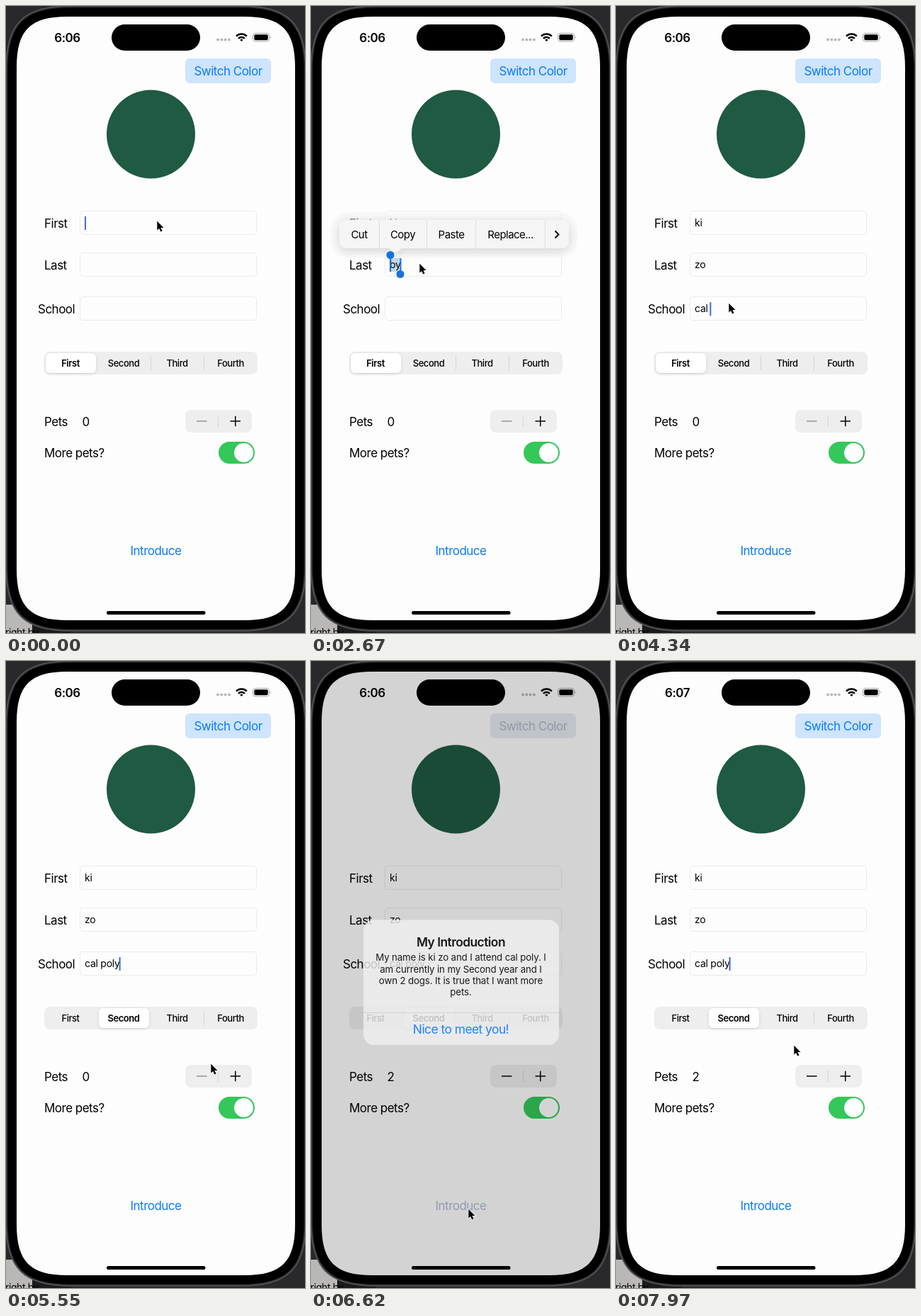
Recreate the animation shown at these times as an HTML page. Size 422 px wide and 885 px high, loop 8 s.

```html
<!DOCTYPE html>
<html lang="en">
<head>
<meta charset="utf-8">
<title>Introduction form</title>
<style>
  html, body { margin: 0; width: 100%; height: 100%; overflow: hidden; background: #29292c; }
  svg { display: block; width: 100vw; height: 100vh; }
  text { font: 17px Inter, sans-serif; letter-spacing: -.03em; white-space: pre; }
  .mid { text-anchor: middle; }
  .bold { font-weight: 600; }
  .field { font-size: 14px; letter-spacing: -.018em; }
  .seg { font-size: 13px; font-weight: 500; letter-spacing: -.035em; text-anchor: middle; }
  .menu { font-size: 15px; letter-spacing: -.035em; text-anchor: middle; }
  .msg { font-size: 13px; letter-spacing: -.01em; text-anchor: middle; }
  .box { fill: #fdfdfd; stroke: #ebebed; }
  .gray { fill: #eeeeef; }
  .line { stroke: #d5d5d8; }
  .blue { fill: #0a7aff; }
</style>
</head>
<body>
<svg viewBox="0 0 422 885">
  <defs>
    <filter id="soft" x="-20%" y="-50%" width="140%" height="200%">
      <feDropShadow dx="0" dy="1.5" stdDeviation="2" flood-opacity=".12"/>
    </filter>
    <filter id="glow" x="-20%" y="-80%" width="140%" height="260%">
      <feDropShadow dx="0" dy="3" stdDeviation="7" flood-opacity=".16"/>
    </filter>
  </defs>

  <!-- desktop and phone body -->
  <rect width="422" height="885" fill="#29292c"/>
  <rect y="845" width="37" height="40" fill="#bab8b6"/>
  <rect x="37" y="845" width="55" height="40" fill="#1b1b1d"/>
  <text x="-1" y="889" style="font-size:14px">right by</text>
  <path id="rim" fill="#2b2b2d" stroke="#58585b" stroke-width="1.5"/>
  <path id="body"/>
  <path id="screen" fill="#fdfdfd"/>

  <!-- status bar -->
  <text id="clock" class="mid bold" x="86.5" y="50.5"></text>
  <path d="M299 47.5h17" stroke="#b9b9bb" stroke-width="4" stroke-linecap="round" stroke-dasharray="0 5.3"/>
  <g fill="none" stroke="#000" stroke-width="2.6">
    <path d="M325 42.6a10.5 10.5 0 0 1 14.8 0M327.9 45.9a6.3 6.3 0 0 1 9 0"/>
    <path d="M332.4 50l-2.2-2.3a3.2 3.2 0 0 1 4.4 0z" fill="#000" stroke="none"/>
  </g>
  <rect x="348.5" y="38.5" width="23" height="11.5" rx="3.5" fill="none" stroke="#a8a8aa"/>
  <rect x="350.3" y="40.3" width="19.4" height="7.9" rx="2"/>
  <path d="M373 42.3q2 2 0 4z" fill="#a8a8aa"/>

  <rect id="switchBox" x="253" y="74" width="121" height="35" rx="6"/>
  <text id="switchText" class="mid" x="313.5" y="98">Switch Color</text>
  <circle cx="204.5" cy="181" r="62.5" fill="#1f5a42"/>

  <!-- form -->
  <text x="54" y="313">First</text>
  <text x="54" y="372">Last</text>
  <text x="45" y="434">School</text>
  <rect class="box" x="104.5" y="289.5" width="249" height="33" rx="4.5"/>
  <rect class="box" x="104.5" y="348.5" width="249" height="33" rx="4.5"/>
  <rect class="box" x="104.5" y="410.5" width="249" height="33" rx="4.5"/>
  <rect id="hint" x="108" y="355" width="20" height="21" rx="3" fill="#dce7fb"/>
  <rect id="marked" x="111" y="356" width="16" height="19" fill="#c3d9f2"/>
  <text class="field" x="111" y="311"></text>
  <text class="field" x="111" y="370"></text>
  <text class="field" x="111" y="432"></text>
  <rect id="caret" width="2" height="19" fill="#4468e0"/>

  <rect class="gray" x="54" y="488" width="301" height="32" rx="8"/>
  <path id="split1" class="line" d="M204.5 494v20"/>
  <path class="line" d="M279.5 494v20"/>
  <rect id="pill" x="56" y="490" width="71" height="28" rx="6.5" fill="#fff" filter="url(#soft)"/>
  <text class="seg" x="91" y="509">First</text>
  <text class="seg" x="166" y="509">Second</text>
  <text class="seg" x="241.5" y="509">Third</text>
  <text class="seg" x="317" y="509">Fourth</text>

  <text x="54" y="593">Pets</text>
  <text id="count" x="107.5" y="593"></text>
  <rect class="gray" x="253" y="570" width="94" height="32" rx="8"/>
  <path id="press" d="M300 570h39a8 8 0 0 1 8 8v16a8 8 0 0 1-8 8h-39z" fill="#d9d9dc"/>
  <path class="line" d="M299.5 578v16"/>
  <path id="minus" d="M269 586h14.5" stroke-width="1.5"/>
  <path d="M316.5 586h14.5M323.75 578.75v14.5" stroke="#000" stroke-width="1.5"/>
  <text x="54" y="637">More pets?</text>
  <rect x="300" y="615" width="51" height="31" rx="15.5" fill="#34c759"/>
  <circle cx="335.5" cy="630.5" r="13.5" fill="#fff"/>
  <text id="intro" class="mid" x="211.5" y="775">Introduce</text>

  <!-- edit menu -->
  <g id="menu">
    <rect x="28" y="291" width="348" height="64" rx="26" fill="#f6f6f6" opacity=".55"/>
    <g filter="url(#glow)" fill="#f5f5f5">
      <rect x="40" y="302" width="324" height="40" rx="10"/>
      <path d="M110 341.5h18l-9 7z"/>
    </g>
    <path class="line" d="M96.5 302v40M163.5 302v40M232.5 302v40M330.5 302v40" opacity=".7"/>
    <text class="menu" x="68" y="327.5">Cut</text>
    <text class="menu" x="129.5" y="327.5">Copy</text>
    <text class="menu" x="198" y="327.5">Paste</text>
    <text class="menu" x="281.5" y="327.5">Replace...</text>
    <path d="M344.5 317.5l5 5-5 5" fill="none" stroke="#000" stroke-width="2"/>
  </g>
  <g id="handles" fill="#1673dc">
    <path d="M111 352h2v23h-2zM125.5 356h2v21h-2z"/>
    <circle cx="112" cy="351.5" r="5.5"/>
    <circle cx="126" cy="378.5" r="5.5"/>
  </g>

  <path id="dim"/>
  <rect x="149" y="26" width="125" height="37" rx="18.5"/>
  <rect x="142" y="854" width="139.5" height="5" rx="2.5"/>

  <g id="alert">
    <rect x="77" y="367.5" width="270" height="172.5" rx="14" fill="#f0f0f0" opacity=".92"/>
    <text class="mid bold" x="211.5" y="404">My Introduction</text>
    <text class="msg" x="211.5" y="424">My name is ki zo and I attend cal poly. I</text>
    <text class="msg" x="211.5" y="440">am currently in my Second year and I</text>
    <text class="msg" x="211.5" y="456">own 2 dogs. It is true that I want more</text>
    <text class="msg" x="211.5" y="472">pets.</text>
    <path class="line" d="M77 495.5h270"/>
    <text class="mid blue" x="211.5" y="524">Nice to meet you!</text>
  </g>

  <path id="mouse" d="M.3 .8v12.8l2.9-2.7 2 4.7 2.3-1-2-4.5h4z" stroke="#fff" stroke-width="1.4" paint-order="stroke"/>
</svg>
<script>
const LOOP = 8000, STEP = 70;
const $ = id => document.getElementById(id);
const fields = document.querySelectorAll('.field'), segs = document.querySelectorAll('.seg');

// The picture is refreshed every STEP ms, counted from the start of each burst of activity.
const bursts = [0, 220, 720, 1230, 1450, 1600, 2100, 2600, 2960, 3330, 3680, 3980, 4340, 4850, 6270, 7200, 7760];

const typed = [
  [[0, ''], [220, 'k'], [360, 'ki']],
  [[0, ''], [1230, 'z'], [1300, 'zo'], [1880, 'by'], [2960, 'z'], [3030, 'zo']],
  [[0, ''], [3980, 'c'], [4050, 'ca'], [4120, 'cal'], [4340, 'cal '],
   [4410, 'cal p'], [4480, 'cal po'], [4550, 'cal poly']]
];
const focus = [[0, 0], [930, 1], [1880, 2], [2450, 1], [2600, -1], [2960, 1],
  [3400, -1], [3680, 2], [5830, -1], [7760, 2]];
const caretY = [297, 356, 418];
const pets = [[0, 0], [5690, 1], [5900, 2]];
const path = [[0, 213, 303], [650, 213, 303], [930, 211, 359], [1530, 211, 359], [1880, 198, 418],
  [2030, 198, 418], [2450, 153, 363], [3260, 153, 363], [3540, 159, 419], [4780, 159, 419],
  [5060, 165, 498], [5270, 165, 498], [5550, 289, 568], [5620, 310, 577], [5690, 318, 580],
  [6200, 318, 580], [6480, 222, 773], [7130, 222, 773], [7410, 245, 512], [7690, 245, 512],
  [7970, 251, 542], [LOOP, 251, 542]];

const at = (list, t) => list.findLast(e => e[0] <= t)[1];
const clamp = x => Math.min(1, Math.max(0, x));
const within = (t, a, b) => t >= a && t < b;
const smooth = x => x * x * (3 - 2 * x);
const mix = (a, b, p) => `rgb(${a.map((v, i) => v + (b[i] - v) * p)})`;
const set = (id, name, value) => $(id).setAttribute(name, value);
const show = (id, on) => set(id, 'opacity', +on);

// Rectangle whose corners ease into the sides, like the phone's display.
function smoothRect(x, y, w, h, r) {
  const a = 1.3 * r, c = .348 * r, R = x + w, B = y + h;
  return `M${x} ${y + a}C${x} ${y + c} ${x + c} ${y} ${x + a} ${y}H${R - a}` +
    `C${R - c} ${y} ${R} ${y + c} ${R} ${y + a}V${B - a}` +
    `C${R} ${B - c} ${R - c} ${B} ${R - a} ${B}H${x + a}` +
    `C${x + c} ${B} ${x} ${B - c} ${x} ${B - a}Z`;
}
const around = gap => smoothRect(15 - gap, 15 - gap, 393 + 2 * gap, 852 + 2 * gap, 55 + gap);
[['rim', 15], ['body', 12.5], ['screen', 0], ['dim', 0]].forEach(([id, gap]) => set(id, 'd', around(gap)));

function mouseAt(t) {
  const i = path.findIndex(p => p[0] > t), a = path[i - 1], b = path[i];
  const p = smooth((t - a[0]) / (b[0] - a[0]));
  return [a[1] + (b[1] - a[1]) * p, a[2] + (b[2] - a[2]) * p];
}

function draw(now) {
  const start = bursts.findLast(b => b <= now);
  const t = start + Math.floor((now - start) / STEP) * STEP;

  fields.forEach((f, i) => f.textContent = at(typed[i], t));
  const row = at(focus, t);
  show('caret', row >= 0);
  if (row >= 0) {
    const width = fields[row].textContent ? fields[row].getComputedTextLength() : 0;
    set('caret', 'x', 111 + Math.max(0, width - 1));
    set('caret', 'y', caretY[row]);
  }
  show('hint', within(t, 1450, 1880));
  show('marked', within(t, 2600, 2960));
  show('handles', within(t, 2600, 2960));
  set('menu', 'opacity', t < 2960 ? clamp((t - 2530) / 140) : 0);

  const slide = smooth(clamp((t - 5060) / 280));
  set('pill', 'x', 56 + 75 * slide);
  show('split1', slide < .5);
  segs.forEach((s, i) => s.style.fontWeight = i === Math.round(slide) ? 600 : 500);

  const n = at(pets, t);
  $('count').textContent = n;
  set('minus', 'stroke', n ? '#000' : '#929295');
  show('press', within(t, 5690, 5760) || within(t, 5900, 5970));

  // The alert settles exponentially and fades out after its button is clicked.
  const rest = t < 6480 ? 1 : Math.exp((6480 - t) / 65);
  const shown = (1 - rest) * clamp((7620 - t) / 140);
  const scale = 1 + .19 * rest;
  set('dim', 'opacity', .19 * shown);
  set('alert', 'opacity', shown);
  set('alert', 'transform', `translate(212 453.75) scale(${scale}) translate(-212 -453.75)`);
  const blue = [10, 122, 255], gray = [197, 197, 204], back = t >= 7480;
  set('intro', 'fill', mix(blue, gray, shown));
  set('switchText', 'fill', mix(blue, [190, 191, 196], shown * (back ? .78 : 1)));
  set('switchBox', 'fill', mix([206, 228, 255], [234, 235, 237], back ? 0 : shown));

  $('clock').textContent = t < 6830 ? '6:06' : '6:07';
  set('mouse', 'transform', `translate(${mouseAt(t)})`);
}

function tick() {
  draw(performance.now() % LOOP);
  requestAnimationFrame(tick);
}
tick();
</script>
</body>
</html>
```
